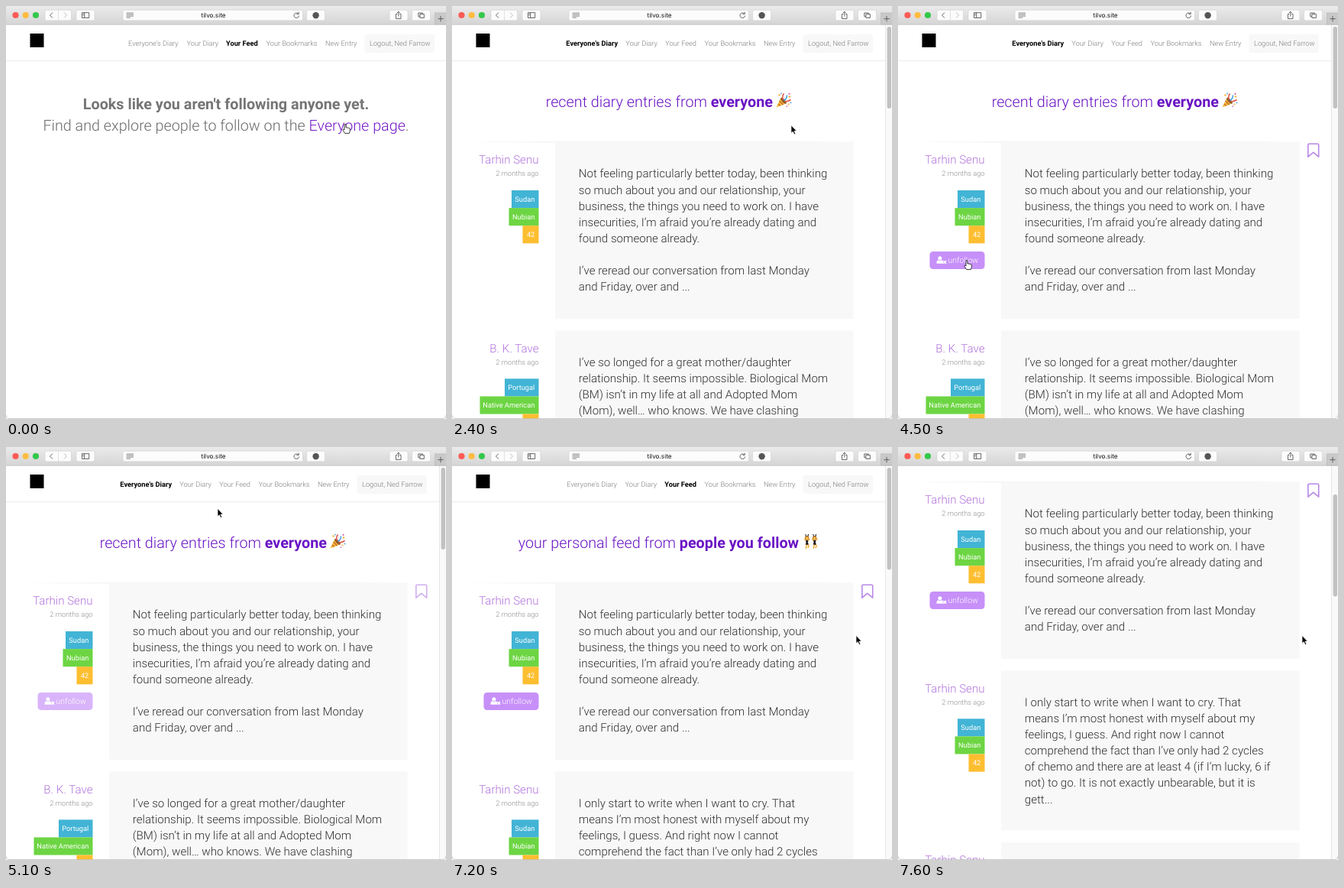
An HTML page that plays this animation: 576x540 px, repeating every 7.7 s.

```html
<!DOCTYPE html>
<html lang="en">
<head>
<meta charset="utf-8">
<title>Diary feed</title>
<style>
html, body { margin: 0; width: 100%; height: 100%; overflow: hidden; background: #fff; }
svg { display: block; width: 576px; height: 540px; }
text { font-family: Roboto, Arial, sans-serif; font-weight: 300; white-space: pre; text-rendering: geometricPrecision; }
.bold { font-weight: 700; }
.nav { font-size: 9.25px; fill: #7d7d7d; }
.nav.on { font-weight: 700; fill: #000; }
.nav.hover { fill: #6a14c4; }
.big { font-size: 19.75px; fill: #6a14c4; }
.name { font-size: 15.1px; fill: #b273dc; text-anchor: end; }
.ago { font-size: 9.25px; fill: #8c8c8c; text-anchor: end; }
.tag { font-size: 9.25px; fill: #fff; font-weight: 400; text-anchor: end; }
.body { font-size: 15.1px; fill: #2e2e2e; }
.btn { font-size: 10.5px; fill: #fff; text-anchor: end; }
.url { font: 400 8.2px Inter, Roboto, sans-serif; text-anchor: middle; fill: #111; }
</style>
</head>
<body>
<svg viewBox="0 0 576 540" xmlns="http://www.w3.org/2000/svg">
  <defs>
    <linearGradient id="bar" x2="0" y2="1"><stop stop-color="#ebebeb"/><stop offset="1" stop-color="#d5d5d5"/></linearGradient>
    <linearGradient id="glow"><stop stop-color="#000" stop-opacity="0"/><stop offset=".5"/><stop offset="1" stop-color="#000" stop-opacity="0"/></linearGradient>
    <linearGradient id="rule"><stop stop-color="#eee" stop-opacity="0"/><stop offset=".2" stop-color="#eee"/><stop offset=".8" stop-color="#eee"/><stop offset="1" stop-color="#eee" stop-opacity="0"/></linearGradient>
    <g id="person" fill="#fff">
      <circle cx="4.4" cy="2.8" r="2.5"/>
      <path d="M0 9.8V8.2Q0 5.5 2.4 5.3Q4.4 6.7 6.4 5.3Q8.8 5.5 8.8 8.2V9.8Z"/>
    </g>
    <g id="popper">
      <path d="M0 19L6 6.5Q12 8 13 14Z" fill="#f6b93b"/>
      <path d="M2.2 14.5L5.4 17M4 10.5L9 15.6" stroke="#c9742a" stroke-width="1.5"/>
      <ellipse cx="9.5" cy="10.3" rx="5" ry="2" transform="rotate(47 9.5 10.3)" fill="#8d5a2b"/>
      <path d="M9 9Q7 5 10 1M11 11Q15 12 19 9" fill="none" stroke="#e2574c" stroke-width="1.6"/>
      <path d="M10 10Q14 8 14 3" fill="none" stroke="#4a9fe0" stroke-width="1.6"/>
      <g fill="#f5b53c"><circle cx="4" cy="3" r="1.2"/><circle cx="17.5" cy="5" r="1.3"/><circle cx="16" cy="15" r="1.1"/></g>
      <g fill="#5aa8e6"><circle cx="6.5" cy="1" r=".9"/><circle cx="19" cy="13" r="1"/></g>
      <g fill="#d861b0"><circle cx="17" cy="1.4" r="1.1"/><circle cx="13.8" cy="17.6" r=".9"/></g>
    </g>
    <g id="dancer">
      <path d="M3.6 3.5L2.8 0M5.6 3.5L6.6 0" stroke="#222" stroke-width="1.1"/>
      <path d="M4.6 9L1 6.5M5 9L8.6 6M4.4 13L3.2 19M5.2 13L7.4 15.6L5.6 18" fill="none" stroke="#f3b13c" stroke-width="1.5"/>
      <circle cx="4.6" cy="5" r="2.7" fill="#b5651d"/>
      <circle cx="4.6" cy="5.3" r="1.8" fill="#fbc94c"/>
      <path d="M3 8H6.4L6 10.5L6.8 13.8H2.8L3.5 10.5Z" fill="#222"/>
    </g>
  </defs>
  <g id="pages"></g>
  <g id="scrollbar">
    <rect x="567" y="24" width="9" height="516" fill="#fafafa"/>
    <path d="M567.5 24V540" stroke="#e6e6e6"/>
    <rect id="thumb" x="569.6" y="27" width="5.4" rx="2.7" fill="#c1c1c1"/>
  </g>
  <g id="chrome">
    <rect width="576" height="24" fill="url(#bar)"/>
    <path d="M0 24.3H576" stroke="#bdbdbd" stroke-width=".8"/>
    <circle cx="12.5" cy="12" r="4.1" fill="#fc5b56"/>
    <circle cx="25.7" cy="12" r="4.1" fill="#fdbc40"/>
    <circle cx="39" cy="12" r="4.1" fill="#34c84a"/>
    <g fill="#fcfcfc" stroke="#cfcfcf" stroke-width=".6">
      <rect x="51" y="5.3" width="34.5" height="13.6" rx="2.2"/>
      <rect x="92" y="5.3" width="24" height="13.6" rx="2.2"/>
      <rect x="153" y="5.3" width="235.5" height="13.6" rx="2.2"/>
      <rect x="393.5" y="5.3" width="24" height="13.6" rx="2.2"/>
      <rect x="502" y="5.3" width="24" height="13.6" rx="2.2"/>
      <rect x="531.5" y="5.3" width="24" height="13.6" rx="2.2"/>
      <path d="M68.5 5.3V18.9"/>
    </g>
    <rect x="561.5" y="9" width="15" height="15" fill="#c9c9c9" stroke="#b4b4b4" stroke-width=".6"/>
    <g fill="none" stroke="#555" stroke-width=".9">
      <path d="M61 8.6L57.5 12.1L61 15.6M569 13V20.4M565.3 16.7H572.7"/>
      <path d="M76 8.6L79.5 12.1L76 15.6" stroke="#b5b5b5"/>
      <path d="M99.5 8.7H108.7V15.5H99.5ZM102.7 8.7V15.5M100.5 10.3H101.8M100.5 12H101.8"/>
      <path d="M157.5 9.2H167M157.5 11.2H167M157.5 13.2H167M157.5 15.2H163" stroke-width=".7"/>
      <path d="M382.9 10.3A3.3 3.3 0 1 0 383.6 12.6M380.4 10.5H383.2V7.8"/>
      <path d="M512.2 10.5H510.5V16.6H517V10.5H515.3M513.8 13.5V7.3M511.9 9.2L513.8 7.2L515.7 9.2"/>
      <path d="M541.9 13.8H539.8V9H545.2V10.5M541.9 10.6H547.3V15.5H541.9Z"/>
    </g>
    <circle cx="405.6" cy="12.2" r="4.2" fill="#555"/>
    <text class="url" x="271.5" y="15.1">tilvo.site</text>
    <path d="M0 535Q.5 539.5 5 539.5H571Q575.5 539.5 576 535" fill="none" stroke="#c4c4c4" stroke-width=".9"/>
  </g>
  <g id="cursor">
    <path id="arrow" d="M0 0V10.3L2.3 8.2L4 12L5.7 11.2L4 7.6H7.2Z" fill="#000" stroke="#fff" stroke-width=".7"/>
    <path id="hand" d="M-1 -1Q0 -2.2 1 -1V3Q2 2.3 2.8 3.3Q4 2.7 4.6 3.7Q6 3.3 6.3 4.8V7.5L5.2 10.6H-.2L-3 6.4Q-3.2 4.8 -1.8 5.2L-1 6Z" fill="#fff" stroke="#222" stroke-width=".9"/>
  </g>
</svg>
<script>
const LOOP = 7700, STEP = 100;
const ME = 'Ned Farrow', WRITER = 'Tarhin Senu', OTHER = 'B. K. Tave';
const $ = id => document.getElementById(id);

const text = (cls, x, y, s) => `<text class="${cls}" x="${x}" y="${y}">${s}</text>`;
const rect = (x, y, w, h, fill, rx = 0) =>
  `<rect x="${x}" y="${y}" width="${w}" height="${h}" fill="${fill}" rx="${rx}"/>`;

function header(xs, active, hover) {
  const labels = ['Everyone’s Diary', 'Your Diary', 'Your Feed', 'Your Bookmarks', 'New Entry', 'Logout, ' + ME];
  const links = labels.map((s, i) =>
    text('nav' + (i === active ? ' on' : i === hover ? ' hover' : ''), xs[i], 52, s.replace('’', "'")));
  return rect(31.5, 36, 18, 18, '#000') +
    rect(xs[5] - 6.5, 37, 91.5, 24, '#f8f8f8', 3) + links.join('') +
    '<path d="M0 71.7H576" stroke="#ebebeb"/>';
}

const TAG_COLORS = ['#42b4d5', '#6dd543', '#fdbe30'];
function entry(y, h, name, tags, lines) {
  const tagSvg = tags.map(([s, w], i) =>
    rect(113.5 - w, y + 63 + i * 23.1, w, 23.1, TAG_COLORS[i]) +
    text('tag', 108.3, y + 77.9 + i * 23.1, s));
  return rect(135, y, 390.5, h, '#f8f8f8') +
    text('name', 113.5, y + 28.2, name) +
    text('ago', 113.5, y + 44.2, '2 months ago') + tagSvg.join('') +
    lines.map((s, i) => text('body', 165.8, y + 46.4 + i * 21.15, s)).join('');
}

function button(id, label, w, sign) {
  const x = 113.5 - w;
  return `<g id="${id}">` + rect(x, 321, w, 23, '#c790f9', 4.5) +
    `<use href="#person" x="${x + 9}" y="327"/>` +
    `<path d="${sign}" transform="translate(${x + 19} 332.5)" stroke="#fff" stroke-width="1.5"/>` +
    text('btn', 105, 335.8, label) + '</g>';
}
const follow = id => button(id, 'follow', 60.5, 'M-1.6 0H3.2M.8 -2.4V2.4');
const unfollow = id => button(id, 'unfollow', 72, 'M-1 .6L2.6 4.2M2.6 .6L-1 4.2');

const mark = '<path d="M538 180.3H549.5Q550.7 180.3 550.7 181.5V197.2L543.7 191.3L536.8 197.2V181.5Q536.8 180.3 538 180.3Z" fill="none" stroke="#b888e6" stroke-width="1.6" stroke-linejoin="round"/>';
const rule = '<rect x="14" y="177.4" width="538" height=".9" fill="url(#rule)"/>';

const writerTags = [['Sudan', 35.5], ['Nubian', 39], ['42', 21]];
const otherTags = [['Portugal', 44.5], ['Native American', 77], ['38', 21]];
const firstEntry = entry(178, 231, WRITER, writerTags, [
  'Not feeling particularly better today, been thinking',
  'so much about you and our relationship, your',
  'business, the things you need to work on. I have',
  'insecurities, I’m afraid you’re already dating and',
  'found someone already.', '',
  'I’ve reread our conversation from last Monday',
  'and Friday, over and ...']);

const pages = {
  empty: header([160, 236.5, 288, 340.5, 418, 476], 2) +
    '<g text-anchor="middle">' +
    '<text class="big bold" x="288" y="135" style="fill:#757575">Looks like you aren\'t following anyone yet.</text>' +
    '<text class="big" x="288" y="163" style="fill:#6b6b6b">Find and explore people to follow on the <tspan fill="#741bc8">Everyone page</tspan>.</text></g>',

  loading: header([161, 237.5, 289, 340.5, 418, 476], -1) +
    rect(0, 71, 576, 3, '#ececec') +
    '<rect id="sweep" y="71.6" width="146" height="2.2" fill="url(#glow)"/>',

  everyone: header([149.3, 227.3, 279.3, 330.5, 408, 466], 0) +
    '<text class="big" x="122.7" y="131.5">recent diary entries from <tspan class="bold">everyone</tspan></text>' +
    '<use href="#popper" x="424.5" y="113.5"/>' + rule + firstEntry +
    `<g id="everyoneTools">${follow('follow')}${unfollow('unfollow')}${mark}</g>` +
    entry(424.3, 231, OTHER, otherTags, [
      'I’ve so longed for a great mother/daughter',
      'relationship. It seems impossible. Biological Mom',
      '(BM) isn’t in my life at all and Adopted Mom',
      '(Mom), well… who knows. We have clashing']),

  feed: header([150.3, 226.5, 278.3, 330.5, 408, 466], 2) +
    '<text class="big" x="86.7" y="131.5">your personal feed from <tspan class="bold">people you follow</tspan></text>' +
    '<use href="#dancer" x="460" y="114"/><use href="#dancer" x="470" y="114"/>' + rule + firstEntry +
    `<g id="feedTools">${unfollow('feedUnfollow')}${mark}</g>` +
    entry(424.3, 209, WRITER, writerTags, [
      'I only start to write when I want to cry. That',
      'means I’m most honest with myself about my',
      'feelings, I guess. And right now I cannot',
      'comprehend the fact than I’ve only had 2 cycles',
      'of chemo and there are at least 4 (if I’m lucky, 6 if',
      'not) to go. It is not exactly unbearable, but it is',
      'gett...']) +
    entry(649, 209, WRITER, writerTags, [])
};
$('pages').innerHTML = Object.entries(pages).map(([id, s]) => `<g id="${id}">${s}</g>`).join('');

// Each row: time, then values at that time.
const schedule = [[0, 'empty'], [1400, 'loading'], [2000, 'everyone'], [5800, 'loading'], [6400, 'feed']];
const cursorPath = [
  [0, 444, 156], [2600, 444, 156], [2900, 370, 200], [3300, 150, 318], [3600, 98, 344],
  [3800, 97, 344], [4000, 90, 334], [4600, 90, 334], [4800, 150, 250], [5100, 277, 80.5],
  [5400, 304, 53.5], [6400, 304, 53.5], [6700, 420, 150], [7000, 529, 246.5]];
const handTimes = [[0, 1400], [4000, 4700], [5400, 5800]];
const everyoneFade = [[2800, 0], [3200, 1], [4950, 1], [5400, 0]];
const feedFade = [[6750, 0], [7100, 1]];
const scrollPath = [[7200, 0], [7300, 8], [7400, 35], [7500, 80], [7600, 132]];

function at(keys, t) {
  const next = keys.findIndex(k => k[0] > t);
  if (next < 0) return keys[keys.length - 1].slice(1);
  if (next === 0) return keys[0].slice(1);
  const a = keys[next - 1], b = keys[next], p = (t - a[0]) / (b[0] - a[0]);
  return a.slice(1).map((v, i) => v + (b[i + 1] - v) * p);
}
const show = (id, on) => { $(id).style.display = on ? '' : 'none'; };

function draw(t) {
  const [since, page] = schedule.filter(s => s[0] <= t).pop();
  for (const id in pages) show(id, id === page);

  const lateLoad = page === 'loading' && since > 3000;
  $('loading').querySelectorAll('.nav')[2].classList.toggle('hover', lateLoad);
  const phase = (t - since + 20) % 490 / 490;
  $('sweep').setAttribute('x', -153 + 736 * phase);

  $('everyoneTools').style.opacity = at(everyoneFade, t)[0];
  $('feedTools').style.opacity = at(feedFade, t)[0];
  show('follow', t < 4300);
  show('unfollow', t >= 4300);
  $('everyone').querySelectorAll('.nav')[2].classList.toggle('hover', t >= 5400);

  const scroll = at(scrollPath, t)[0];
  $('feed').setAttribute('transform', `translate(0 ${-scroll})`);
  show('scrollbar', page === 'everyone' || page === 'feed');
  $('thumb').setAttribute('y', 27 + scroll * .265);
  $('thumb').setAttribute('height', page === 'feed' ? 133.5 : 107);

  const [x, y] = at(cursorPath, t);
  const hand = handTimes.some(([a, b]) => t >= a && t < b);
  show('hand', hand);
  show('arrow', !hand);
  $('cursor').setAttribute('transform', `translate(${x} ${y})`);
}

const start = performance.now();
function tick() {
  const t = (performance.now() - start) % LOOP;
  draw(Math.floor(t / STEP) * STEP);
  requestAnimationFrame(tick);
}
draw(0);
requestAnimationFrame(tick);
</script>
</body>
</html>
```
